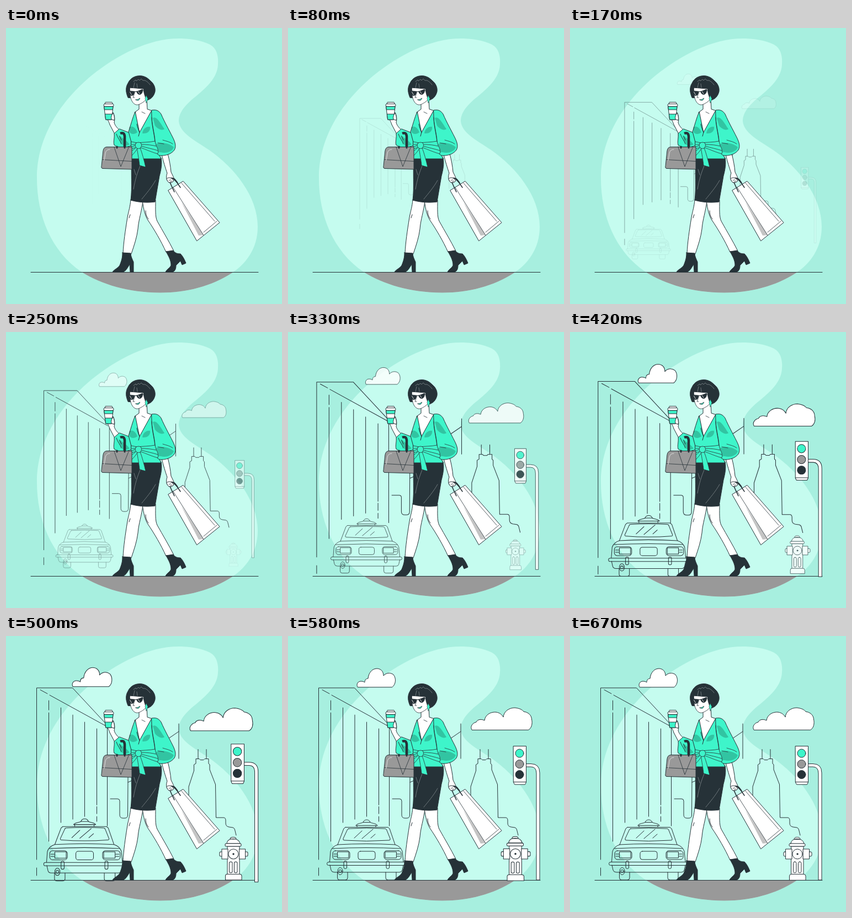
Recreate the animation shown at these times as an HTML page. Size 500 by 500 pixels, loop 710 ms.

```html
<!DOCTYPE html>
<html lang="en">
<head>
<meta charset="utf-8">
<title>City walk</title>
<style>
  html, body { margin: 0; width: 100%; height: 100%; overflow: hidden; background: #a7efdf; }
  svg { display: block; width: 100vw; height: 100vh; }
  .ink { fill: none; stroke: #263238; stroke-width: 1; stroke-linecap: round; stroke-linejoin: round; }
  .white { fill: #fff; }
  .teal { fill: #3ef5ca; }
  .grey { fill: #999; }
  .dark { fill: #263238; }
  .shade { fill: #000; fill-opacity: .2; stroke: none; }
  .light { stroke: #8d9599; stroke-width: .7; }
  .thin { stroke-width: .8; }
</style>
</head>
<body>
<svg viewBox="0 0 500 500">
  <defs>
    <path id="blob" d="M318 19C340 20 362 24 374 33C383 41 385 54 384 66C383 90 364 107 345 123C326 138 313 152 313 169C315 190 341 203 368 221C414 253 456 305 456 360C456 400 434 428 409 444C372 468 325 480 278 479.500C222 479 174 465 137 442C82 405 56 340 56 272C56 195 101 131 155 86C202 48 262 17 318 19Z"/>
    <clipPath id="below"><path d="M0 442.500H500V500H0Z"/></clipPath>
  </defs>

  <use href="#blob" fill="#c5fcef"/>
  <use href="#blob" class="grey" clip-path="url(#below)"/>

  <g id="city" class="ink">
    <path d="M55.500 405V94H120.500L181 159M55.500 420V434M62 97.500L75 104.500M79 107L181 163"/>
    <path d="M77.500 117V134M77.500 139V372M99.500 130V338M121 143V332M142.500 156V327M164.500 168V306M164.500 309V322M164.500 327V336M183.500 166V344"/>
    <path d="M189 295H202Q206 295 206 299V324Q206 330 212 330H215Q220 330 220.500 325L221 256M221 265L228 262"/>
    <path d="M313 159V222M313 173L294 186"/>
    <path d="M348 205.500V222M363 205.500V222M331 310V273L340.500 244V233L344 231V222.500H350L352 224.500H358L360 222.500H367V231L369 233V242L379.500 269L380.500 329H394Q398 329 398 334V339Q398 345 404 346L411 347Q414 348 414.500 351L417 361"/>
  </g>

  <g id="clouds" class="ink white">
    <path d="M126 92.500C123 87 127 82 132 82C135 82 137 82.500 139 84C139 80 141 77 145 77C146 66 153 59 161 59C168 59 173 64 173 72C178 66 186 66 191 70C196 76 196 87 189 92.500Z"/>
    <path d="M333 170C329 164 335 157 341 156C343 151 350 150 356 153C357 143 367 137 377 138C384 139 388 143 390 147C391 136 401 130 411 130C419 131 424 133 427 137C435 138 441 143 441.500 151C443 158 442 166 436 170Z"/>
  </g>

  <g id="car" class="ink">
    <path d="M123 343C127 338.500 132 340 136 337.500C138 331.500 147 331.500 149 337.500C153 340 158 338.500 162 343Z"/>
    <path d="M136 337.500H149M125 343V346M159 343V346M104 346.500H181L184 349L194 378M104 346.500L101 349L90 378"/>
    <path d="M110 349Q142 347 176 349Q178 349 179 352L185 367Q186 370 183 370Q142 373 102 370Q99 370 100 367L107 352Q108 349 110 349ZM120 366L134 353M134 367L154 350M150 366L158 359"/>
    <path d="M90 378Q142 375 194 378Q204 381 207 390L209 409M90 378Q80 381 77 390L75.500 409M80 385Q142 382 204 385"/>
    <g id="lamp">
      <rect x="81" y="389" width="31" height="16" rx="5"/>
      <path d="M90 391H110V402H90ZM83 395H89M83 399H89"/>
    </g>
    <use href="#lamp" transform="matrix(-1 0 0 1 286 0)"/>
    <rect x="127" y="390" width="31" height="15" rx="4"/>
    <path d="M76 415L78 424Q79 428 84 428H202Q206 428 207 424L209 415"/>
    <rect x="70.500" y="409.500" width="143" height="6" rx="3"/>
    <rect x="101" y="407.500" width="5.500" height="14" rx="2.500"/>
    <rect x="178" y="407.500" width="5.500" height="14" rx="2.500"/>
    <path d="M89.500 428V438Q89.500 442 93.500 442H104Q108 442 108 438V428M177 428V438Q177 442 181 442H192Q196 442 196 438V428"/>
    <ellipse cx="94.500" cy="426" rx="4.500" ry="6.500"/><circle cx="94.500" cy="426" r="2.500"/>
  </g>

  <path class="ink" d="M45 442.500H457"/>

  <g id="signal" class="ink white">
    <path d="M431 231.500H440Q456 231.500 456 248V442H450V249Q450 237 440 237H431Z"/>
    <path d="M408.500 199.500H431.500V265L429.500 269H410.500L408.500 265ZM408.500 264.500H431.500"/>
    <circle class="teal" cx="419.500" cy="212.500" r="7.500"/>
    <circle class="grey" cx="419.500" cy="232" r="7.500"/>
    <circle class="dark" cx="419.500" cy="251" r="7.500"/>
  </g>

  <g id="hydrant" class="ink white">
    <path d="M406 368Q406 364.500 411.500 364.500Q417 364.500 417 368ZM400 376Q401 367.500 411.500 367.500Q422 367.500 424 376ZM401 381H423V432H401Z"/>
    <rect x="397" y="376" width="29" height="5" rx="2"/>
    <rect x="387" y="391" width="6" height="8" rx="2"/><rect x="391" y="386" width="11" height="18"/>
    <rect x="432" y="391" width="6" height="8" rx="2"/><rect x="422.500" y="386" width="11" height="18"/>
    <circle cx="412" cy="395" r="9"/><circle class="dark" cx="412" cy="395" r="1.200"/>
    <rect x="404.500" y="409" width="5.500" height="20" rx="2.700"/><rect x="413.500" y="409" width="5.500" height="20" rx="2.700"/>
    <path d="M397.500 442V435Q397.500 431.500 401 431.500H423Q427 431.500 427 435V442Z"/>
  </g>

  <g id="woman" class="ink">
    <!-- legs and boots -->
    <path class="white" d="M247 312C249 328 252 340 257 348C268 364 281 386 290 406L304 404C295 386 284 368 274 350C270 342 271 328 271 312Z"/>
    <path class="white" d="M226 311C225 324 222 332 220 343C216 368 213 388 212 408L227 409C232 394 237 380 239 364C240 348 246 332 248 313Z"/>
    <path d="M253 331C253 338 255 342 258 346M225 338L223 344"/>
    <path class="dark" d="M211 407L226 408C226 414 229 419 231 424V442H225L224 428C221 433 217 441 212 442H193C195 438 203 435 206 430C210 420 211 415 211 407Z"/>
    <path class="dark" d="M290 405L303 403C306 408 311 409 316 409C321 414 324 421 326 426L319 429L316 422L308 430C308 435 307 440 302 442H289C291 437 297 435 299 430C299 420 294 413 290 405Z"/>
    <!-- skirt -->
    <path class="dark" d="M228 235H281C283 246 281 257 278 268L270 315C256 317 240 316 226 312C229 288 226 262 228 235Z"/>
    <path class="light" d="M231 292C234 274 238 262 243 250M232 256L235 266M246 310C254 300 263 290 271 276"/>
    <!-- raised arm and cup -->
    <path class="white" d="M184 166C186 169 187 172 188 175L198 194L206 185C201 181 197 176 196 171C198 164 196 157 194 153L191 157L190 165Z"/>
    <path class="white" d="M178 142H194L191.500 166H181Z"/>
    <path class="teal" d="M178 142H194L193.300 148H178.700ZM179.700 156H192.600L191.500 166H181Z"/>
    <path class="white" d="M179 138L180 134.500H192L193.500 138Z"/>
    <rect class="white" x="177" y="137.500" width="18" height="4.500" rx="2"/>
    <path class="white" d="M191 165C190 162 191 158 194 154C196 158 197 162 196 167Z"/>
    <!-- face and neck -->
    <path class="white" d="M241 134V147L233 153L242 190L265 150L256 147L255 130Z"/>
    <path class="thin" d="M246 152L252 155"/>
    <path class="dark" d="M221 126C217 117 216 108 221 100C225 91 233 86.500 243 86.500C252 87 257 91 262 96C268 101 271 108 270 115C268 124 262 130 254 131L246 128Z"/>
    <path class="white thin" d="M224.500 107C224 116 225 127 228 132C231 138 236 140.500 241 138.500C247 136 252 132 254 129C251 122 249 116 249 109L241 106L240 109L231 106.500L229 108Z"/>
    <path class="dark" d="M223 108L249 110L244 98L226 99Z"/>
    <path d="M233 99L231 108M237 101L238 108" class="light"/>
    <path class="light" d="M231 97L235 94L236 96L240 93L242 95L245 92L248 95L252 95C256 97 259 100 261 103"/>
    <path class="dark thin" d="M220.500 113.500L233 115C233.500 119.500 231 122.500 227.500 122.500C224 122 222 118 220.500 113.500ZM237 115L247.500 111C248 116 246 120 242.500 120.500C239 120.500 237 118 237 115ZM233 115.300H237ZM247 113L253 113.500"/>
    <path d="M224.500 116L227.500 121M239.500 115L242 119" stroke="#fff" stroke-width=".8"/>
    <path class="thin" d="M232 121L230 126H233"/>
    <path class="teal thin" d="M235 130C238 130 240 129 242.500 127C242 131 239 132.500 235 130Z"/>
    <path class="teal" stroke-width=".5" d="M254 122L257 128L254 136L252 128Z"/>
    <!-- blouse -->
    <path class="teal" d="M205 183L196 191C197 199 194 206 196 212C204 218 218 217 227 213L226 191Z"/>
    <path class="shade" d="M204 194C210 199 219 204 224 211L214 215C208 208 205 202 204 194Z"/>
    <path d="M200 192C202 199 207 204 209 210M206 196L209 203"/>
    <path class="teal" d="M234 152C229 163 226 176 222 188L227 207V237H281L276 226L270 206L268 150L264 149L242 189Z"/>
    <path class="shade" d="M223 180C228 176 235 180 238 189C233 193 227 193 224 189ZM247 191C248 183 254 178 261 179C262 186 257 192 247 191Z"/>
    <path d="M237 174C238 180 240 185 242 189L240 196"/>
    <path class="white" d="M282 229C285 242 289 254 292 263C290 268 290 274 294 279C298 282 303 279 305 274C303 269 301 265 299 261C298 250 296 239 293 228Z"/>
    <path class="teal" d="M264 149C272 147 277 150 281 156C288 172 294 182 302 198C306 206 309 214 305 221C299 229 288 232 278 231C272 228 269 222 270 210C270 196 264 178 264 163Z"/>
    <path class="shade" d="M266 163C273 159 278 170 287 183C282 187 274 182 270 177ZM272 210C282 206 297 209 304 216C301 224 290 228 280 225L272 226Z"/>
    <path class="thin" d="M264 162C265 180 270 194 270 207M284 203C290 205 297 206 302 210M275 208L286 210"/>
    <!-- sash -->
    <path class="teal thin" d="M227 206L237 208C248 207 260 207 270 205L272 213C276 219 276 225 275 228C264 225 253 220 245 217L233 217L227 219Z"/>
    <path class="thin" d="M246 211C256 211 264 212 272 214M245 214C255 217 266 219 275 222M228 211H234M228 215L234 213"/>
    <path class="teal thin" d="M237 216C239 229 241 239 242 249L253 252C250 239 247 228 243 217ZM236 216C232 220 229 222 227 223V232C232 227 236 222 239 217Z"/>
    <path class="teal thin" d="M235 209Q240 205 245 209Q247 214 243 218Q238 220 235 216Q233 212 235 209Z"/>
    <!-- handbag -->
    <path d="M207 191Q214 188 215 196V216" stroke-width="4.500" stroke-linecap="butt"/>
    <path class="grey" d="M176 222Q177 215.500 183 215.500H228V256L175 254.500Q172 254 173 250Z"/>
    <path class="thin" d="M174.500 238.500L228 241.500M196 216L208 251L222 217"/>
    <path d="M188 220Q181 220 180 227L178 240" stroke="#ddd"/>
    <path d="M201 215V217M215 214V217" stroke-width="3"/>
    <!-- shopping bag -->
    <path class="white" d="M294 294L321 277.500L387 352.500L346 385.500Z"/>
    <path fill="#c4c4c4" stroke="none" d="M317 314L358 375L349 376Z"/>
    <path class="thin" d="M303 289L358 375.500M382 350L358 370M318 281L378 350"/>
    <path d="M305 297C301 288 297 281 295 274C300 268 306 274 316 289M299 272C305 270 310 278 313 285" stroke-width="1.500"/>
    <path class="white" d="M291 273C294 270 299 271 302 274L304 277C300 281 295 281 293 278Z"/>
    <path class="thin" d="M295 276L299 275M297 279L301 277"/>
  </g>
</svg>
<script>
  const LOOP = 710, STEP = LOOP / 17, GROW = 485;

  // id, start in ms, centre of growth
  const parts = [
    ['city', -23, 236, 263],
    ['clouds', 75, 284, 114.5],
    ['car', 75, 142, 388],
    ['signal', 75, 432.5, 321],
    ['hydrant', 170, 412, 403]
  ].map(([id, delay, x, y]) => ({ el: document.getElementById(id), delay, x, y }));

  const bezier = (a, b, u) => 3 * (1 - u) ** 2 * u * a + 3 * (1 - u) * u * u * b + u ** 3;

  // cubic-bezier(.36, -.01, .5, 1.38)
  function ease(x) {
    if (x <= 0) return 0;
    if (x >= 1) return 1;
    let lo = 0, hi = 1;
    for (let i = 0; i < 24; i++) {
      const mid = (lo + hi) / 2;
      if (bezier(.36, .5, mid) < x) lo = mid; else hi = mid;
    }
    return bezier(-.01, 1.38, lo);
  }

  const start = performance.now();

  function draw() {
    // step changes fall on rounded hundredths of a second
    const step = Math.floor(((performance.now() - start) % LOOP + 5) / STEP);
    const time = step < 2 ? 0 : step * STEP; // the first pose is held for two steps
    for (const { el, delay, x, y } of parts) {
      const grown = ease((time - delay) / GROW);
      el.setAttribute('transform', `translate(${x} ${y}) scale(${.5 + grown / 2}) translate(${-x} ${-y})`);
      el.setAttribute('opacity', Math.min(1, Math.max(0, grown)));
    }
    requestAnimationFrame(draw);
  }
  draw();
</script>
</body>
</html>
```
